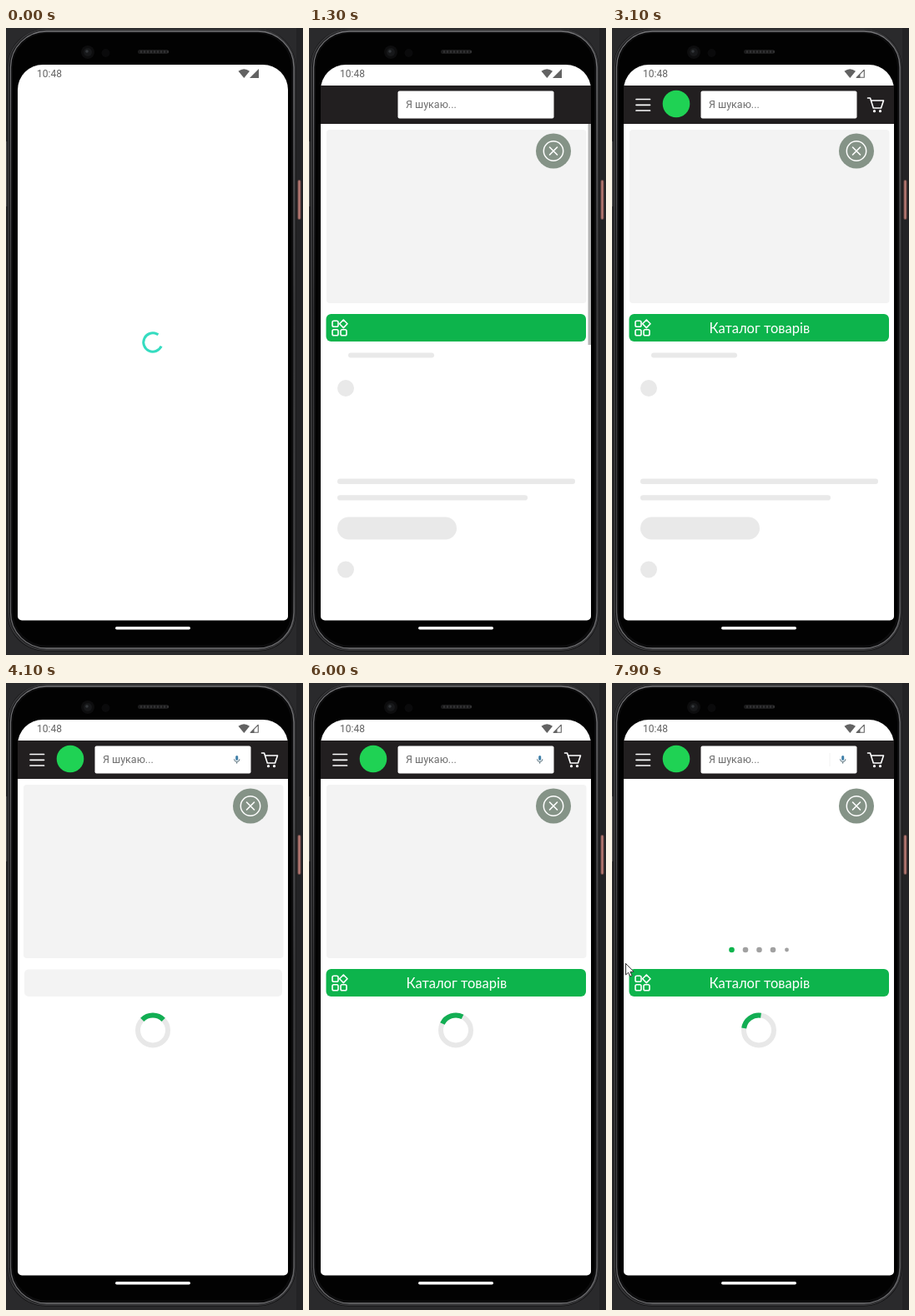
Recreate the animation shown at these times as an HTML page with a canvas. Size 356 px wide and 752 px high, loop 8000 ms.

```html
<!DOCTYPE html>
<html lang="uk">
<head>
<meta charset="utf-8">
<title>Phone loading</title>
<style>
  html, body { margin: 0; width: 100%; height: 100%; overflow: hidden; background: #2a2a2c; }
  canvas { display: block; width: 356px; height: 752px; }
</style>
</head>
<body>
<canvas id="stage"></canvas>
<script>
const W = 356, H = 752, LOOP = 8000, STEP = 100;
const GREEN = '#0db44c', BONE = '#e9e9e9', PANEL = '#f3f3f3', STATUS = '#626262';
const canvas = document.getElementById('stage');
const ctx = canvas.getContext('2d');
const dpr = window.devicePixelRatio || 1;
canvas.width = W * dpr;
canvas.height = H * dpr;

// Moments at which the screen changes
const T = {
  page: 1200, icons: 1400, label: 1500, fade: 1800, signal: 2600,
  loader: 4100, button: 4300, close: 500, cursor: 6400, slides: 7200
};

function box(x, y, w, h, r, color) {
  ctx.fillStyle = color;
  ctx.beginPath();
  ctx.roundRect(x, y, w, h, r);
  ctx.fill();
}

function frame(x, y, w, h, r, color, width) {
  ctx.strokeStyle = color;
  ctx.lineWidth = width;
  ctx.beginPath();
  ctx.roundRect(x, y, w, h, r);
  ctx.stroke();
}

function dot(x, y, r, color) {
  ctx.fillStyle = color;
  ctx.beginPath();
  ctx.arc(x, y, r, 0, Math.PI * 2);
  ctx.fill();
}

function arc(x, y, r, from, to, color, width) {
  const rad = Math.PI / 180;
  ctx.strokeStyle = color;
  ctx.lineWidth = width;
  ctx.beginPath();
  ctx.arc(x, y, r, from * rad, to * rad);
  ctx.stroke();
}

function line(color, width, ...p) {
  ctx.strokeStyle = color;
  ctx.lineWidth = width;
  ctx.lineCap = ctx.lineJoin = 'round';
  ctx.beginPath();
  for (let i = 0; i < p.length; i += 2) ctx.lineTo(p[i], p[i + 1]);
  ctx.stroke();
  ctx.lineCap = 'butt';
}

function poly(color, ...p) {
  ctx.fillStyle = color;
  ctx.beginPath();
  for (let i = 0; i < p.length; i += 2) ctx.lineTo(p[i], p[i + 1]);
  ctx.closePath();
  ctx.fill();
}

function text(str, x, y, font, color) {
  ctx.font = font;
  ctx.fillStyle = color;
  ctx.fillText(str, x, y);
}

function phone() {
  ctx.fillStyle = '#2a2a2c';
  ctx.fillRect(0, 0, W, H);
  box(348, 0, 8, H, 0, '#232325');
  box(349.5, 182, 4, 48, 2, '#6d4a47');
  box(350.5, 183, 2, 46, 1, '#bd7d76');
  box(0, 136, 1.5, 78, 0, '#505052');

  const rim = ctx.createLinearGradient(0, 0, 0, H);
  rim.addColorStop(0, '#77777a');
  rim.addColorStop(0.1, '#6c6c6f');
  rim.addColorStop(0.45, '#38383a');
  rim.addColorStop(0.85, '#48484a');
  rim.addColorStop(1, '#77777a');
  box(1.5, 1, 346, 746.5, 46, '#0c0c0d');
  frame(3, 2, 343, 744, 45, '#343436', 2);
  frame(5.5, 4, 339.5, 740, 43, rim, 1.3);
  box(8, 6.5, 334, 734, 41, '#020202');

  dot(98, 29, 8, '#0d0d0e');
  dot(98, 29, 5, '#17181a');
  dot(97, 28, 1.8, '#34373b');
  dot(119.5, 30, 5, '#0a0a0b');
  box(158, 26, 37, 5, 2.5, '#1b1b1c');
  for (let x = 161; x < 194; x += 4) box(x, 27, 2, 3, 1, '#343436');

  box(14, 44, 324, 666.5, [30, 30, 5, 5], '#fff');
  box(131, 718, 90, 3.5, 1.75, '#fff');
}

function statusBar(t) {
  text('10:48', 37, 59, '12px Roboto, sans-serif', STATUS);
  ctx.fillStyle = STATUS;
  ctx.beginPath();
  ctx.moveTo(278.5, 51.8);
  ctx.quadraticCurveTo(285.3, 46.6, 292, 51.8);
  ctx.lineTo(285.3, 60);
  ctx.fill();
  if (t < T.signal) {
    poly(STATUS, 292, 60, 303, 60, 303, 49);
  } else {
    line(STATUS, 1.1, 293.2, 59.3, 302.3, 59.3, 302.3, 50.2, 293.2, 59.3);
    poly(STATUS, 292.5, 60, 297.5, 60, 297.5, 55);
  }
}

function closeButton() {
  dot(293, 147.5, 21, '#859387');
  arc(293, 147.5, 11.7, 0, 360, '#fff', 1.5);
  line('#fff', 1.6, 288.5, 143, 297.5, 152);
  line('#fff', 1.6, 297.5, 143, 288.5, 152);
}

function header(t) {
  box(14, 69, 324, 46, 0, '#221f20');
  box(106.5, 75.5, 187, 33, 2, '#fff');
  text('Я шукаю...', 116, 96, '12.5px Roboto, sans-serif', '#6e6e6e');
  if (t < T.icons) return;

  for (const y of [85.5, 92.3, 99]) line('#fff', 1.7, 29, y, 45.5, y);
  dot(77, 91, 16.3, '#1fd254');
  line('#fff', 1.6, 306.5, 84, 309.5, 84, 313.3, 96, 322.5, 96, 325.5, 87, 311, 87);
  dot(314.5, 99.7, 1.6, '#fff');
  dot(321.5, 99.7, 1.6, '#fff');

  if (t >= T.loader) {
    box(275.2, 87, 3, 5.8, 1.5, '#3f7fa8');
    arc(276.7, 91.3, 3.2, 0, 180, '#58707c', 1);
    line('#58707c', 1, 276.7, 94.8, 276.7, 96.3);
  }
  if (t >= T.cursor) box(260.5, 84, 1, 16, 0, '#f3f3f3');
}

function catalog(t) {
  if (t >= T.loader && t < T.button) {
    box(22, 343.5, 309, 32.5, 5, PANEL);
    return;
  }
  box(20.5, 343, 311.5, 33, 6, GREEN);
  frame(28, 351.3, 7, 7, 1.8, '#fff', 1.6);
  frame(28, 361.8, 7, 7, 1.8, '#fff', 1.6);
  frame(38, 361.8, 7, 7, 1.8, '#fff', 1.6);
  line('#fff', 1.6, 41.3, 350, 46, 354.8, 41.3, 359.6, 36.6, 354.8, 41.3, 350);
  if (t >= T.label) text('Каталог товарів', 116.5, 365.5, '16.5px Lato, "Open Sans", sans-serif', '#fff');
}

function bones() {
  box(47, 389.5, 103, 6, 3, BONE);
  dot(44, 432, 10, BONE);
  box(34, 540.5, 285, 6.5, 3.2, BONE);
  box(34, 560.3, 228, 6.3, 3.1, BONE);
  box(34, 586.5, 143, 27, 13.5, BONE);
  dot(44, 649.5, 10, BONE);
}

// Roughly one turn in two seconds, slightly uneven
function turn(t) {
  if (t < 5100) return (t - 4100) * 0.19;
  if (t < 6900) return 190 + (t - 5100) * 0.1683;
  return 493 + (t - 6900) * 0.19;
}

function loader(t) {
  const a = turn(t) - 90;
  arc(176, 416.5, 18, 0, 360, '#e8e8e8', 6);
  arc(176, 416.5, 18, a - 45, a + 45, '#12ae53', 6);
}

function slides() {
  for (let i = 0; i < 5; i++) {
    dot(143.5 + i * 16.5, 320, i === 4 ? 2.4 : 3.3, i ? '#a1a1a1' : GREEN);
  }
}

function cursor() {
  const p = [16.5, 336.5, 16.5, 350, 19.6, 347.2, 21.8, 352, 24, 351, 21.9, 346.5, 26, 346.2];
  poly('#fff', ...p);
  line('#333', 1, ...p, 16.5, 336.5);
}

function startSpinner(t) {
  const k = Math.max(0, t - 100) / STEP;
  arc(176, 377, 11.2, 25 + k * 32, 305 + k * 24, '#35dcc0', 3);
}

function page(t) {
  if (t < T.slides) box(21, 122, 311.5, 208, 4, PANEL);
  else slides();
  header(t);
  catalog(t);
  if (t < T.loader) bones();
  else loader(t);
  const bar = t < T.fade ? 1 : 1 - (t - T.fade + STEP) / 400;
  if (bar > 0) {
    ctx.globalAlpha = bar;
    box(334.5, 115, 3.5, 265, 0, '#b4b4b4');
    ctx.globalAlpha = 1;
  }
}

function draw(now) {
  const t = Math.floor((now % LOOP) / STEP) * STEP;
  ctx.setTransform(dpr, 0, 0, dpr, 0, 0);
  phone();
  statusBar(t);
  if (t < T.close) startSpinner(t);
  if (t >= T.page) page(t);
  if (t >= T.close) closeButton();
  if (t >= T.cursor) cursor();
}

const start = performance.now();
function tick() {
  draw(performance.now() - start);
  requestAnimationFrame(tick);
}
tick();
</script>
</body>
</html>
```
